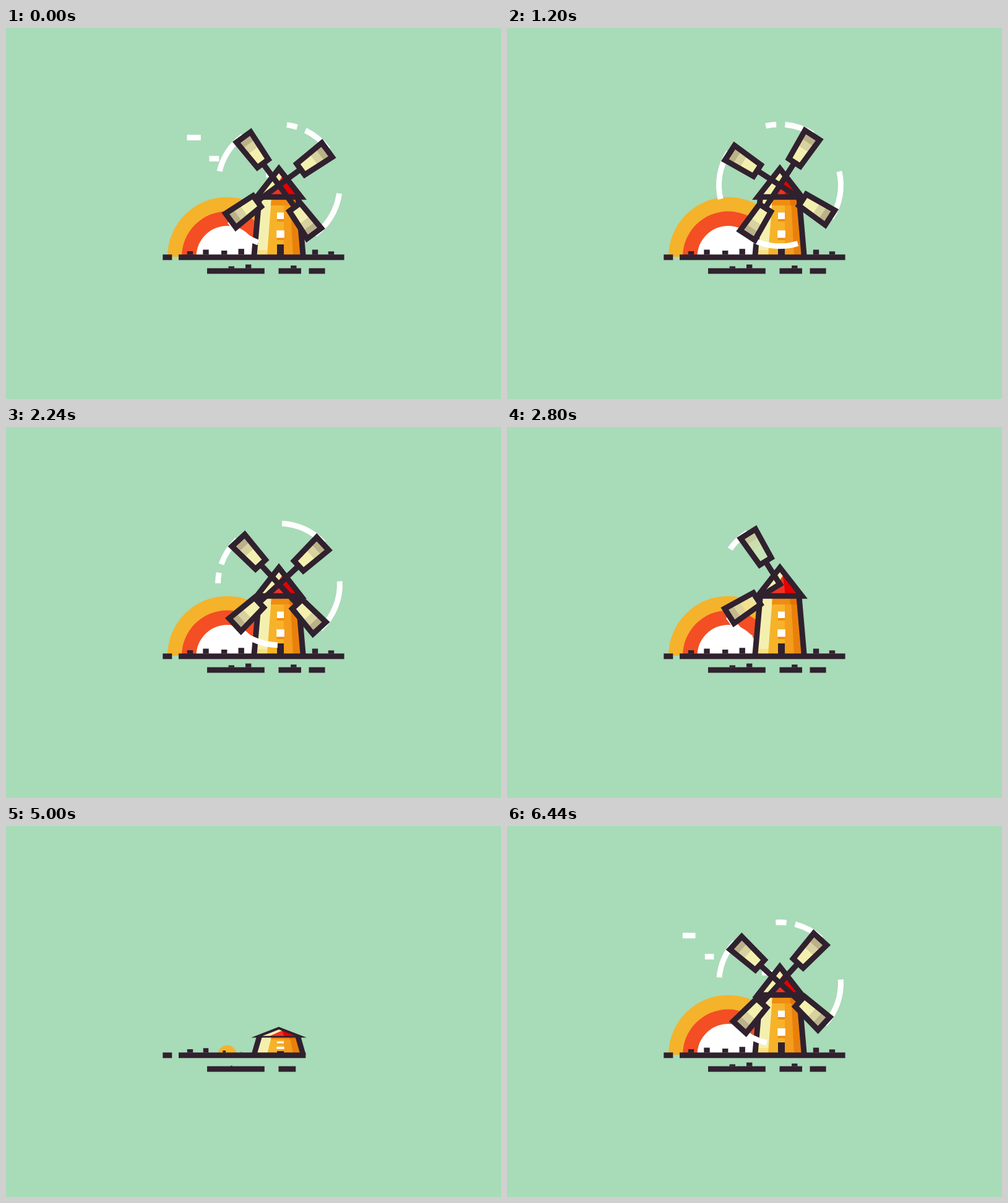
These frames come from a looping animation (800x600 px, 6.48 s). An HTML page with a canvas:

```html
<!DOCTYPE html>
<html lang="en">
<head>
<meta charset="utf-8">
<title>Windmill</title>
<style>
html, body { margin: 0; height: 100%; overflow: hidden; background: #a8dbb8; }
canvas { display: block; }
</style>
</head>
<body>
<canvas id="stage" width="800" height="600"></canvas>
<script>
const ctx = document.getElementById('stage').getContext('2d');
const LOOP = 6480, STEP = 40;
const DARK = '#30212f', PALE = '#f3f0af';
const HUB = [441, 254.3];
const RAD = Math.PI / 180;

// The story runs from the empty scene (4440) to the next empty scene (10920).
let now = 0;
const linear = (a, b) => Math.min(1, Math.max(0, (now - a) / (b - a)));
const smooth = (a, b) => (1 - Math.cos(Math.PI * linear(a, b))) / 2;
// Rises during [a, b] and falls during [c, d].
const inOut = (a, b, c, d, ease = smooth) => ease(a, b) * (1 - ease(c, d));

function rect(color, x, y, w, h) {
  ctx.fillStyle = color;
  ctx.fillRect(x, y, w, h);
}

function trace(points, closed) {
  ctx.beginPath();
  points.forEach(([x, y]) => ctx.lineTo(x, y));
  if (closed) ctx.closePath();
}

function poly(color, ...points) {
  trace(points, true);
  ctx.fillStyle = color;
  ctx.fill();
}

function line(points, closed) {
  trace(points, closed);
  ctx.strokeStyle = DARK;
  ctx.lineWidth = 9;
  ctx.stroke();
}

// Clouds: dashes whose tail follows the head along the same run.
function cloud(x, y, start, lag) {
  const run = at => 224 * smooth(at, at + 1200);
  const tail = run(start), head = run(start - lag);
  rect('#fff', x + tail, y - 4.5, head - tail, 9);
}

function clouds() {
  for (const start of [5565, 6625]) {
    cloud(226, 237.2, start, 90);
    cloud(260, 271.2, start, 65);
  }
  cloud(251, 177.2, 6140, 90);
  cloud(287, 211.3, 6140, 65);
}

function sun() {
  [['#f4b32b', 96.5], ['#f44e24', 73.5], ['#fff', 50]].forEach(([color, r], i) => {
    const size = inOut(4880 + i * 90, 5340 + i * 90, 9600 - i * 80, 9920 - i * 80);
    ctx.beginPath();
    ctx.arc(357.5, 370, r * size, Math.PI, 0);
    ctx.fillStyle = color;
    ctx.fill();
  });
}

function tower() {
  const grow = inOut(4800, 5340, 9900, 10450);
  if (!grow) return;
  ctx.save();
  ctx.translate(0, 370);
  ctx.scale(1, grow);
  ctx.translate(0, -370);

  poly('#f6b32a', [409, 276], [472, 276], [480, 367], [401, 367]);
  poly(PALE, [409, 276], [429, 276], [422, 367], [401, 367]);
  poly('#f49c1c', [449, 276], [460, 276], [465, 367], [449, 367]);
  poly('#ea800c', [459, 276], [472, 276], [480, 367], [464, 367]);
  poly('#ef8d11', [429, 276], [457, 276], [458, 287], [428, 287]);
  poly('#e57405', [457, 276], [472, 276], [473, 287], [458, 287]);
  rect('#fbe080', 404, 359, 18, 8);
  rect('#ef8d11', 438, 309, 11, 4);
  rect('#ef8d11', 437.5, 339, 12, 4);
  rect('#fff', 438, 298.5, 11, 10.5);
  rect('#fff', 437.2, 327.3, 12.6, 12);
  rect(DARK, 438, 350, 11, 18);
  line([[409.3, 274], [400.8, 370]]);
  line([[472, 274], [480.3, 370]]);

  poly('#e60000', [441, 228], [476, 273], [406, 273]);
  poly('#f03322', [446, 241], [450, 273], [406, 273], [441, 228]);
  poly(PALE, [441, 228], [447, 239], [424, 273], [406, 273]);
  line([[441, 227.5], [476.7, 273.3], [405.3, 273.3]], true);
  ctx.restore();
}

function bar(segments, y, left, right) {
  for (const [a, b] of segments) {
    const x = Math.max(a, left);
    rect(DARK, x, y, Math.max(0, Math.min(b, right) - x), 9);
  }
}

function bump(x, y, h, start, end) {
  const size = inOut(start, start + 160, end, end + 150);
  rect(DARK, x - 4.7 * size, y - h * size, 9.4 * size, h * size);
}

function ground() {
  bar([[253.3, 268.3], [279, 546.6]], 366.3,
    253 + 294 * smooth(10115, 10840), 253 + 294 * smooth(4500, 5220));
  bar([[325, 417.8], [440.5, 477], [489.5, 515.6]], 388.5,
    325 + 191 * smooth(10430, 10830), 325 + 191 * smooth(4640, 5180));

  for (const [x, h] of [[297.5, 5.5], [323, 8], [352.7, 6.5], [380.2, 9.3], [499.5, 8], [525.5, 5.2]])
    bump(x, 366.5, h, 4760 + (x - 253) * 1.6, 10040 + (x - 253) * 1.7);
  for (const [x, h] of [[364.3, 3.3], [391.7, 6.2], [464.8, 4.5]])
    bump(x, 388.7, h, 4860 + (x - 325) * 2, 10350 + (x - 364) * 3);
}

// Sails in drawing order; trail lists pairs of degrees behind the arm.
const sails = [
  { turn: -45,  draw: 5400, sweep: 5605, unsweep: 8700, fade: 8730, erase: 8900, trail: [[0, 46]] },
  { turn: -135, draw: 5470, sweep: 5705, unsweep: 8760, fade: 8780, erase: 8930, trail: [[0, 28], [36.3, 46.3]] },
  { turn: 135,  draw: 5680, sweep: 6140, unsweep: 9020, fade: 9160, erase: 9390, trail: [[0, 46]] },
  { turn: 45,   draw: 5760, sweep: 6240, unsweep: 9080, fade: 9230, erase: 9450, trail: [[0, 50]] }
];

// Steady spin, then an even slowdown to rest.
function spin() {
  const steady = Math.max(0, Math.min(now, 8380) - 5812);
  const slow = Math.min(1702, Math.max(0, now - 8380));
  return 0.2826 * (steady + slow) - 0.000083 * slow * slow;
}

function trail(sail) {
  const grown = inOut(sail.sweep, sail.sweep + 400, sail.unsweep, sail.unsweep + 400, linear);
  if (!grown) return;
  const full = sail.trail[sail.trail.length - 1][1];
  const reach = 10 + (full - 10) * grown;
  ctx.strokeStyle = '#fff';
  ctx.lineWidth = 9;
  for (const [a, b] of sail.trail) {
    if (reach <= a) continue;
    ctx.beginPath();
    ctx.arc(0, 0, 98.5, (-90 - Math.min(b, reach)) * RAD, (-90 - a) * RAD);
    ctx.stroke();
  }
}

function blade({ draw, fade, erase }) {
  const half = r => 11 + (r - 43.7) * 0.06;
  const band = (color, a, b) =>
    poly(color, [-half(a), -a], [half(a), -a], [half(b), -b], [-half(b), -b]);

  ctx.globalAlpha = inOut(draw + 40, draw + 220, fade, fade + 200, linear);
  band(PALE, 43.7, 96.5);
  band('#d8d2a0', 70, 96.5);
  band('#bbb189', 82.5, 96.5);
  ctx.globalAlpha = 1;

  const arm = inOut(draw - 60, draw + 60, erase + 220, erase + 310, linear);
  if (arm) line([[0, 4.5], [0, 4.5 - 48.2 * arm]]);

  const edge = inOut(draw, draw + 365, erase, erase + 300);
  if (!edge) return;
  const inner = half(43.7), outer = half(96.5);
  const length = 2 * (inner + outer + Math.hypot(52.8, outer - inner));
  if (edge < 1) ctx.setLineDash([length * edge, 1000]);
  line([[0, -43.7], [-inner, -43.7], [-outer, -96.5], [outer, -96.5], [inner, -43.7]], true);
  ctx.setLineDash([]);
}

function mill() {
  const turned = spin();
  for (const part of [trail, blade]) {
    for (const sail of sails) {
      ctx.save();
      ctx.translate(...HUB);
      ctx.rotate((sail.turn + turned) * RAD);
      part(sail);
      ctx.restore();
    }
  }
}

function frame() {
  const t = Math.floor(performance.now() % LOOP / STEP) * STEP;
  now = t < 4440 ? t + LOOP : t;
  rect('#a8dbb8', 0, 0, 800, 600);
  clouds();
  sun();
  tower();
  ground();
  mill();
  requestAnimationFrame(frame);
}
frame();
</script>
</body>
</html>
```
